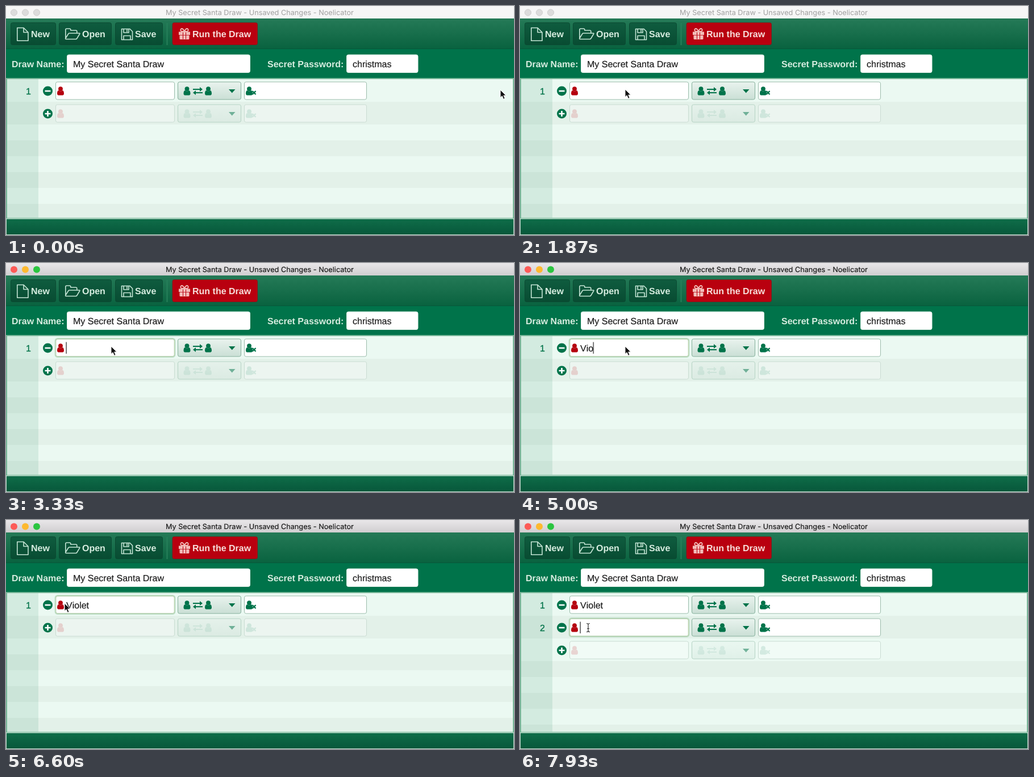
An HTML page for the animation above (8 s loop, 894 by 404 pixels).

```html
<!DOCTYPE html>
<html lang="en">
<head>
<meta charset="utf-8">
<title>Secret Santa Draw</title>
<style>
  html, body { margin: 0; width: 100%; height: 100%; overflow: hidden; }
  svg { display: block; font: 16px "Liberation Sans", Arial, sans-serif; text-rendering: geometricPrecision; }
  .bold { font-weight: bold; fill: #d6ecdf; }
  .title { font: 12.7px Inter, sans-serif; }
  .green { fill: #00734a; }
  .red { fill: #b5000f; }
  .line { fill: none; stroke: #c4e4d4; stroke-width: 1.6; stroke-linejoin: round; }
  .ink { fill: #1c1c1c; stroke: #1c1c1c; stroke-width: .2; }
  .count { fill: #00734a; stroke: #00734a; stroke-width: .3; }
  .name { font-kerning: none; }

  .anim { animation: 8s step-end infinite; }
  .blurred { animation-name: blurred; }
  .active { animation-name: active; }
  .hover { animation-name: hover; }
  .focus { animation-name: focus; }
  .caret { animation-name: caret; }
  .type { animation-name: type; }
  .before { animation-name: before; }
  .after { animation-name: after; }
  .focus2 { animation-name: focus2; }
  .arrow { animation-name: arrow; }
  .beam { animation-name: beam; }
  .mouse { animation: mouse 8s linear infinite; }

  @keyframes blurred { 0% { opacity: 1 } 27.5%, to { opacity: 0 } }
  @keyframes active { 0% { opacity: 0 } 27.5%, to { opacity: 1 } }
  @keyframes hover { 0%, 14.16%, to { opacity: 0 } 12.5% { opacity: 1 } }
  @keyframes focus { 0%, 94.125%, to { opacity: 0 } 29.1% { opacity: 1 } }
  @keyframes caret {
    0%, 35%, 56.625%, 81.625%, 94.125%, to { opacity: 0 }
    29.1%, 41.625%, 57.5%, 87.5% { opacity: 1 }
  }
  @keyframes type {
    0% { transform: translateX(106px) }
    50% { transform: translateX(116.7px) }
    57.5% { transform: translateX(120.2px) }
    62.5% { transform: translateX(129.1px) }
    66.625% { transform: translateX(132.7px) }
    71.625% { transform: translateX(141.6px) }
    75%, to { transform: translateX(146.2px) }
  }
  @keyframes before { 0% { opacity: 1 } 96.625%, to { opacity: 0 } }
  @keyframes after { 0% { opacity: 0 } 96.625%, to { opacity: 1 } }
  @keyframes focus2 { 0% { opacity: 0 } 98.33%, to { opacity: 1 } }
  @keyframes arrow { 0% { opacity: 1 } 97.5%, to { opacity: 0 } }
  @keyframes beam { 0% { opacity: 0 } 97.5%, to { opacity: 1 } }
  @keyframes mouse {
    0% { transform: translate(870px, 148px) }
    4.167% { transform: translate(870px, 148px); animation-timing-function: steps(10) }
    12.5% { transform: translate(379px, 158px); animation-timing-function: steps(3) }
    15% { transform: translate(238px, 157px); animation-timing-function: steps(3) }
    17.5% { transform: translate(191px, 134px) }
    20.83% { transform: translate(191px, 134px); animation-timing-function: steps(3) }
    23.33% { transform: translate(185px, 147px) }
    77.5% { transform: translate(185px, 147px); animation-timing-function: steps(6) }
    82.5% { transform: translate(103px, 147px); animation-timing-function: steps(4) }
    85.83% { transform: translate(67px, 164px); animation-timing-function: steps(3) }
    88.33% { transform: translate(70px, 184px); animation-timing-function: steps(3) }
    90.83% { transform: translate(87px, 190px) }
    95.83% { transform: translate(87px, 190px); animation-timing-function: steps(4) }
    99.125%, to { transform: translate(120px, 190px) }
  }
</style>
</head>
<body>
<svg width="894" height="404" viewBox="0 0 894 404">
  <defs>
    <linearGradient id="chrome" x2="0" y2="1"><stop stop-color="#e9e7e9"/><stop offset="1" stop-color="#d0ced0"/></linearGradient>
    <linearGradient id="bar" x2="0" y2="1"><stop stop-color="#257a57"/><stop offset="1" stop-color="#09623f"/></linearGradient>
    <linearGradient id="foot" x2="0" y2="1"><stop stop-color="#0f6d49"/><stop offset="1" stop-color="#07573a"/></linearGradient>
    <linearGradient id="dark" x2="0" y2="1"><stop stop-color="#0f5c3f"/><stop offset="1" stop-color="#084c32"/></linearGradient>
    <linearGradient id="combo" x2="0" y2="1"><stop stop-color="#e9f3ee"/><stop offset="1" stop-color="#cadfd5"/></linearGradient>

    <g id="person">
      <ellipse cy="-3.8" rx="3.9" ry="4"/>
      <path d="M-6 4.600C-6 .8-4.800-1-3.200-1C-1.800.8 1.800.8 3.200-1C4.800-1 6 .8 6 4.600C6 6.500 5 7.400 3.800 7.400H-3.800C-5 7.400-6 6.500-6 4.600Z"/>
    </g>
    <g id="pair" class="green">
      <use href="#person" x="318.500" y="150"/>
      <use href="#person" x="356" y="150"/>
      <path d="M329 146h12v-3l5 4-5 4v-3h-12zM346 152h-12v-3l-5 4 5 4v-3h12z"/>
    </g>
    <g id="exclude" class="green">
      <use href="#person" x="428" y="150"/>
      <path d="M433.500 150l6 6m0-6l-6 6" stroke="#00734a" stroke-width="2.400"/>
    </g>
    <path id="drop" class="green" d="M392 147h11.500l-5.750 6.500z"/>
    <circle id="disc" class="green" cx="73.500" cy="150" r="8.500"/>

    <g id="live">
      <use href="#disc"/>
      <path d="M68.500 150h10" stroke="#fff" stroke-width="2.600"/>
      <g fill="#fff" stroke="#9bbcab">
        <rect x="87.500" y="134" width="209" height="31" rx="3"/>
        <rect x="419.500" y="134" width="215" height="31" rx="3"/>
        <rect x="302.500" y="134" width="111" height="31" rx="3" fill="url(#combo)" stroke="#86b09c"/>
      </g>
      <use class="red" href="#person" x="96" y="150"/>
      <use href="#pair"/><use href="#drop"/><use href="#exclude"/>
    </g>
    <g id="idle">
      <use href="#disc"/>
      <path d="M68.500 150h10m-5-5v10" stroke="#fff" stroke-width="2.600"/>
      <g fill="#fff" fill-opacity=".32" stroke="#c9dcd2">
        <rect x="87.500" y="134" width="209" height="31" rx="3"/>
        <rect x="419.500" y="134" width="215" height="31" rx="3"/>
        <rect x="302.500" y="134" width="111" height="31" rx="3" fill="url(#combo)" stroke="#b5d3c4"/>
      </g>
      <use class="red" href="#person" x="96" y="150" opacity=".15"/>
      <use href="#pair" opacity=".08"/><use href="#drop" opacity=".5"/><use href="#exclude" opacity=".12"/>
    </g>
    <g id="ring" fill="none">
      <rect x="87" y="133.500" width="210" height="32" rx="4" stroke="#a3d3b4" stroke-opacity=".6" stroke-width="3"/>
      <rect x="87.500" y="134" width="209" height="31" rx="3" stroke="#c3d3ac"/>
    </g>
    <path id="bow" d="M314 45C312.500 41.500 311 40 309.500 40C306.500 40 306.500 45 310 45Z"/>
  </defs>

  <rect width="894" height="404" fill="#00734a"/>

  <!-- title bar -->
  <g class="anim blurred">
    <rect width="894" height="22" fill="#f6f6f6"/>
    <g fill="#dcdcdc" stroke="#cecece"><circle cx="14" cy="11.500" r="5.600"/><circle cx="34" cy="11.500" r="5.600"/><circle cx="54" cy="11.500" r="5.600"/></g>
    <text class="title" x="281" y="16" fill="#a0a0a0">My Secret Santa Draw - Unsaved Changes - Noelicator</text>
  </g>
  <g class="anim active">
    <rect width="894" height="22" fill="url(#chrome)"/>
    <circle cx="14" cy="11.500" r="6" fill="#fc5b57"/><circle cx="34" cy="11.500" r="6" fill="#fdb92f"/><circle cx="54" cy="11.500" r="6" fill="#2bc540"/>
    <text class="title ink" x="281" y="16">My Secret Santa Draw - Unsaved Changes - Noelicator</text>
  </g>

  <!-- toolbar -->
  <rect y="22" width="894" height="54" fill="url(#bar)"/>
  <path d="M0 75.500h894" stroke="#07583a"/>
  <path d="M283.500 30v39" stroke="#26805a" stroke-width="2"/>
  <g fill="url(#dark)" stroke="#0b4a32">
    <rect x="8.500" y="29.500" width="79" height="39" rx="3"/>
    <rect x="93.500" y="29.500" width="92" height="39" rx="3"/>
    <rect x="192.500" y="29.500" width="83" height="39" rx="3"/>
    <rect x="293" y="29.500" width="149.500" height="39" rx="3" fill="#b9000f" stroke="#7c1a1c"/>
  </g>
  <g class="line">
    <path d="M19.800 38.500H31l8 8V61.200H19.800zM31 38.500v8h8"/>
    <path d="M104.800 56V42q0-2 2-2h5q2 0 2 2v1h9q2 0 2 2v3M104.800 57l5-8q.6-1 2-1H129q1.500 0 .5 1.500L125 57q-1 1.500-2 1.500h-17q-2 0-1.200-1.500"/>
    <path d="M203.500 40.500H218l4.500 4.500V59.500H203.500zM207 40.500v6.500h9v-6.500M207 59.500v-7h12v7M213 41v5"/>
  </g>
  <g fill="#f2bcb8">
    <path d="M304 45.500h20v5.500h-20zM305.500 51.800h17V57.500q0 1.500-1.500 1.500h-14q-1.500 0-1.500-1.500z"/>
    <path d="M311.500 46.500v12m5-12v12" stroke="#b9000f"/>
    <g fill="none" stroke="#f2bcb8" stroke-width="1.800">
      <use href="#bow"/>
      <use href="#bow" transform="matrix(-1 0 0 1 628 0)"/>
    </g>
  </g>
  <g class="bold">
    <text x="44" y="55">New</text>
    <text x="134" y="55">Open</text>
    <text x="227" y="55">Save</text>
    <text x="328" y="55" fill="#f7dedb">Run the Draw</text>
    <text x="10" y="107.500">Draw Name:</text>
    <text x="460" y="107.500">Secret Password:</text>
  </g>
  <g fill="#fff" stroke="#dfeee6">
    <rect x="107.500" y="86" width="322" height="31.500" rx="3"/>
    <rect x="599.500" y="86" width="125.500" height="31.500" rx="3"/>
  </g>
  <g class="ink">
    <text x="118" y="107.500">My Secret Santa Draw</text>
    <text x="610" y="107.500">christmas</text>
  </g>

  <!-- table -->
  <rect y="127" width="894" height="248" fill="#78b799"/>
  <rect x="2" y="129" width="890" height="244.500" fill="#ebf9f2"/>
  <g fill="#e3f1e9">
    <path class="anim before" d="M2 169h890v40H2zM2 237h890v28H2zM2 293h890v28H2zM2 349h890v24.500H2z"/>
    <path class="anim after" d="M2 169h890v40H2zM2 249h890v28H2zM2 305h890v28H2zM2 361h890v12.500H2z"/>
  </g>
  <rect x="2" y="129" width="55" height="244.500" fill="#00754a" opacity=".1"/>
  <rect x=".5" y="375.500" width="893" height="28" fill="url(#foot)" stroke="#cfe3d8"/>

  <!-- first row -->
  <text class="count" x="35" y="155.500">1</text>
  <use href="#live"/>
  <g class="anim hover">
    <rect x="303" y="134.500" width="110" height="30" rx="3" fill="#fff" opacity=".45"/>
    <use href="#pair"/><use href="#drop"/>
  </g>
  <use class="anim focus" href="#ring"/>
  <text class="name ink" x="106" y="155.500">Violet</text>
  <g class="anim type">
    <rect y="138" width="50" height="24" fill="#fff"/>
    <rect class="anim caret" x="-.5" y="139.500" width="1.200" height="20.500" fill="#222"/>
  </g>

  <!-- following rows -->
  <use class="anim before" href="#idle" y="40"/>
  <g class="anim after">
    <text class="count" x="35" y="195.500">2</text>
    <use href="#live" y="40"/>
    <use href="#idle" y="80"/>
  </g>
  <g class="anim focus2">
    <use href="#ring" y="40"/>
    <rect x="105.500" y="179.500" width="1.200" height="20.500" fill="#222"/>
  </g>

  <!-- mouse -->
  <g class="mouse">
    <path class="anim arrow" d="M0 0V13.500L3.100 10.700L5.500 16.300L8 15.200L5.700 9.900H9.900Z" fill="#111" stroke="#fff" stroke-width=".9"/>
    <path class="anim beam" d="M-3-7.500Q0-7.500 0-5.500Q0-7.500 3-7.500M0-5.500V5.500M-3 7.500Q0 7.500 0 5.500Q0 7.500 3 7.500M-2 1.500H2" fill="none" stroke="#333" stroke-width="1.200"/>
  </g>
</svg>
</body>
</html>
```
